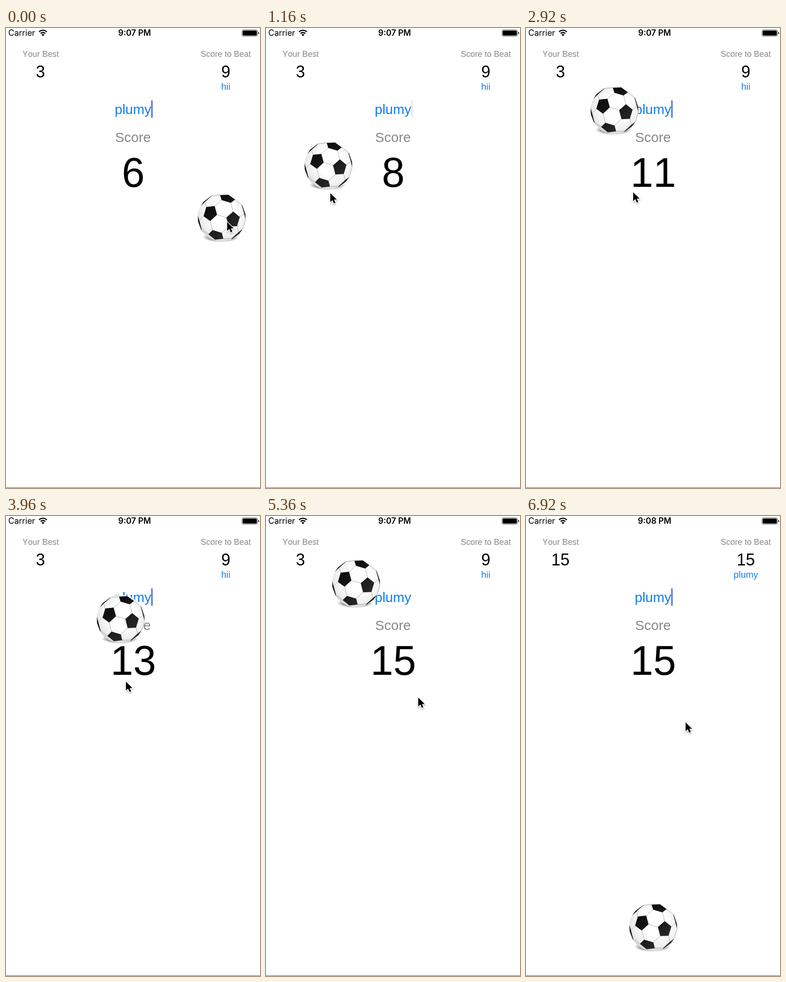
These frames come from a looping animation (557 by 1005 pixels, 7.04 s). An HTML page:

```html
<!DOCTYPE html>
<html lang="en">
<head>
<meta charset="utf-8">
<title>Ball juggling game</title>
<style>
  html, body { margin: 0; width: 100%; height: 100%; overflow: hidden; background: #fff; }
  svg { display: block; font-family: "Liberation Sans", Arial, sans-serif; font-kerning: none; }
  .mid { text-anchor: middle; }
  .status { font: 18px Inter, sans-serif; }
  .label { font-size: 18.2px; fill: #888; }
  .record { font-size: 36px; }
  .name { fill: #0f7df0; }
</style>
</head>
<body>
<svg width="557" height="1005" viewBox="0 0 557 1005">
  <defs>
    <radialGradient id="skin" cx=".55" cy=".42" r=".66">
      <stop offset=".4" stop-color="#fff"/>
      <stop offset=".75" stop-color="#eee"/>
      <stop offset="1" stop-color="#c4c4c4"/>
    </radialGradient>
    <linearGradient id="patch" x2="1" y2="1">
      <stop offset="0"/>
      <stop offset="1" stop-color="#333"/>
    </linearGradient>
    <radialGradient id="shade">
      <stop offset=".6" stop-color="#777"/>
      <stop offset="1" stop-color="#999" stop-opacity="0"/>
    </radialGradient>
    <filter id="soft" x="-50%" y="-50%" width="200%" height="200%">
      <feDropShadow dx="0" dy="2" stdDeviation="1.5" flood-opacity=".35"/>
    </filter>
  </defs>

  <text class="status" x="5" y="17">Carrier</text>
  <path d="M72.5 8.5a12 12 0 0 1 17 0M75.8 12a7.4 7.4 0 0 1 10.4 0" fill="none" stroke="#000" stroke-width="2.6"/>
  <path d="M81 18l-3-3.2a4.3 4.3 0 0 1 6 0z"/>
  <text class="status mid" id="clock" x="282" y="17" style="font-weight:600"></text>
  <rect x="517.5" y="4" width="34" height="14" rx="3" fill="none" stroke="#555"/>
  <rect x="519" y="5.5" width="31" height="11" rx="2"/>
  <path d="M553 8.5q2 .5 2 2.5t-2 2.5z"/>

  <g class="mid">
    <text class="label" x="76" y="63">Your Best</text>
    <text class="record" id="best" x="75.5" y="107.5"></text>
    <text class="label" x="482" y="63">Score to Beat</text>
    <text class="record" id="beat" x="482" y="107.5"></text>
    <text class="name" id="holder" x="482" y="135" font-size="20"></text>
    <text class="name" x="278.5" y="188" font-size="30">plumy</text>
    <text x="278.5" y="249" font-size="30" fill="#888">Score</text>
    <text id="score" x="279" y="346.5" font-size="90"></text>
  </g>
  <rect id="caret" x="318.5" y="158" width="3" height="38" rx="1" fill="#4a6bd8"/>

  <g id="ball">
    <ellipse cx="-2" cy="43" rx="40" ry="11" fill="url(#shade)"/>
    <circle r="52.5" fill="url(#skin)"/>
    <path id="seams" fill="none" stroke="#999" stroke-width=".7" stroke-dasharray="2 1"/>
    <path id="patches" fill="url(#patch)"/>
  </g>
  <path d="M0 1004H557" stroke="#666"/>
  <g id="cursor">
    <path transform="scale(.92)" d="M0 0V21L5 16.3L8.6 24.4L12.4 22.7L9 15H15.5z"
      stroke="#fff" stroke-width="3" paint-order="stroke" filter="url(#soft)"/>
  </g>
</svg>
<script>
const LOOP = 7040, STEP = 40, HALF_GRAVITY = 0.0018;
const LOST = 6304, RETURN = 520, HOME = [279, 898];
const RADIUS = 52.5, TURN = 0.29, TILT = 0.06;

// Time and ball x of each tap; the last one is missed
const taps = [
  [-570, 473], [60, 473], [690, 266], [1290, 101], [1940, 312], [2566, 194],
  [3166, 194], [3857, 243], [4517, 297], [5285, 177], [5823, 324]
];
const FIRST_SCORE = 6;

// Time, x and y of the places where the pointer rests
const rests = [
  [0, 485, 424], [1160, 141, 361], [1940, 349, 390], [2920, 235, 359],
  [3960, 263, 362], [4760, 306, 345], [5880, 350, 427], [LOOP, 350, 451]
];

const $ = id => document.getElementById(id);
const mix = (a, b, p) => a + (b - a) * p;
const clamp = v => Math.max(0, Math.min(1, v));
const place = (id, [x, y]) => $(id).setAttribute("transform", `translate(${x} ${y})`);
const write = (id, text) => { $(id).textContent = text; };
const segment = (list, t) => Math.min(list.findLastIndex(item => item[0] <= t), list.length - 2);

// The ball is a truncated icosahedron seen along the middle of an edge
const dot = (a, b) => a[0] * b[0] + a[1] * b[1] + a[2] * b[2];
const cross = ([a, b, c], [x, y, z]) => [b * z - c * y, c * x - a * z, a * y - b * x];
const third = (a, b) => {
  const p = a.map((v, i) => 2 * v + b[i]), size = Math.hypot(...p);
  return p.map(v => v / size);
};

function rotate([x, y, z]) {
  const c = Math.cos(TURN), s = Math.sin(TURN), side = x * s + y * c;
  return [x * c - y * s, side * Math.cos(TILT) - z * Math.sin(TILT), z * Math.cos(TILT) + side * Math.sin(TILT)];
}

function project([x, y, z]) {
  const scale = z < 0 ? RADIUS / Math.hypot(x, y) : RADIUS;
  return `${(x * scale).toFixed(1)} ${(y * scale).toFixed(1)}`;
}

function buildBall() {
  const golden = (1 + Math.sqrt(5)) / 2, size = Math.hypot(1, golden), corners = [];
  for (const a of [-1 / size, 1 / size]) {
    for (const b of [-golden / size, golden / size]) {
      corners.push([a, 0, b], [0, b, a], [b, a, 0]);
    }
  }
  const centres = corners.map(rotate);
  let patches = "", seams = "";
  for (const centre of centres) {
    const near = centres.filter(c => Math.abs(dot(c, centre) - 0.447) < 0.01);
    const first = near[0], side = cross(centre, first);
    const angle = n => Math.atan2(dot(side, n), dot(first, n) - 0.2);
    near.sort((a, b) => angle(a) - angle(b));
    const rim = near.map(n => third(centre, n));
    if (rim.some(p => p[2] > 0)) patches += "M" + rim.map(project).join("L") + "z";
    near.forEach((n, i) => {
      if (rim[i][2] > 0) seams += `M${project(rim[i])}L${project(third(n, centre))}`;
    });
  }
  $("patches").setAttribute("d", patches);
  $("seams").setAttribute("d", seams);
}

function flight(t, i) {
  const [start, x] = taps[i], [end, nextX] = taps[i + 1];
  const apexTime = (start + end) / 2 + 10, apexY = 306 - 26 * i;
  return [mix(x, nextX, (t - start) / (end - start)), apexY + HALF_GRAVITY * (t - apexTime) ** 2];
}

function comeBack(t) {
  const [x, y] = flight(LOST, taps.length - 2), left = 1 - clamp((t - LOST) / RETURN);
  return [mix(HOME[0], x, left ** 1.25), mix(HOME[1], y, left ** 3)];
}

function pointer(t) {
  const i = segment(rests, t), [start, x, y] = rests[i], [end, nextX, nextY] = rests[i + 1];
  const p = clamp((t - start) / (end - start) * 1.1), eased = p * p * (3 - 2 * p);
  return [mix(x, nextX, eased), mix(y, nextY, eased)];
}

function caretAlpha(t) {
  const phase = t % 1000;
  return phase < 400 ? 1 - clamp((phase - 40) / 145) : clamp((phase - 430) / 150);
}

function draw(now) {
  const t = Math.floor((now % LOOP) / STEP) * STEP;
  const lost = t >= LOST, i = segment(taps, t);

  place("ball", lost ? comeBack(t) : flight(t, i));
  place("cursor", pointer(t));
  $("caret").setAttribute("opacity", caretAlpha(t));
  write("score", FIRST_SCORE + i);
  write("clock", lost ? "9:08 PM" : "9:07 PM");
  write("best", lost ? 15 : 3);
  write("beat", lost ? 15 : 9);
  write("holder", lost ? "plumy" : "hii");
}

buildBall();
const began = performance.now();
function tick() {
  draw(performance.now() - began);
  requestAnimationFrame(tick);
}
tick();
</script>
</body>
</html>
```
